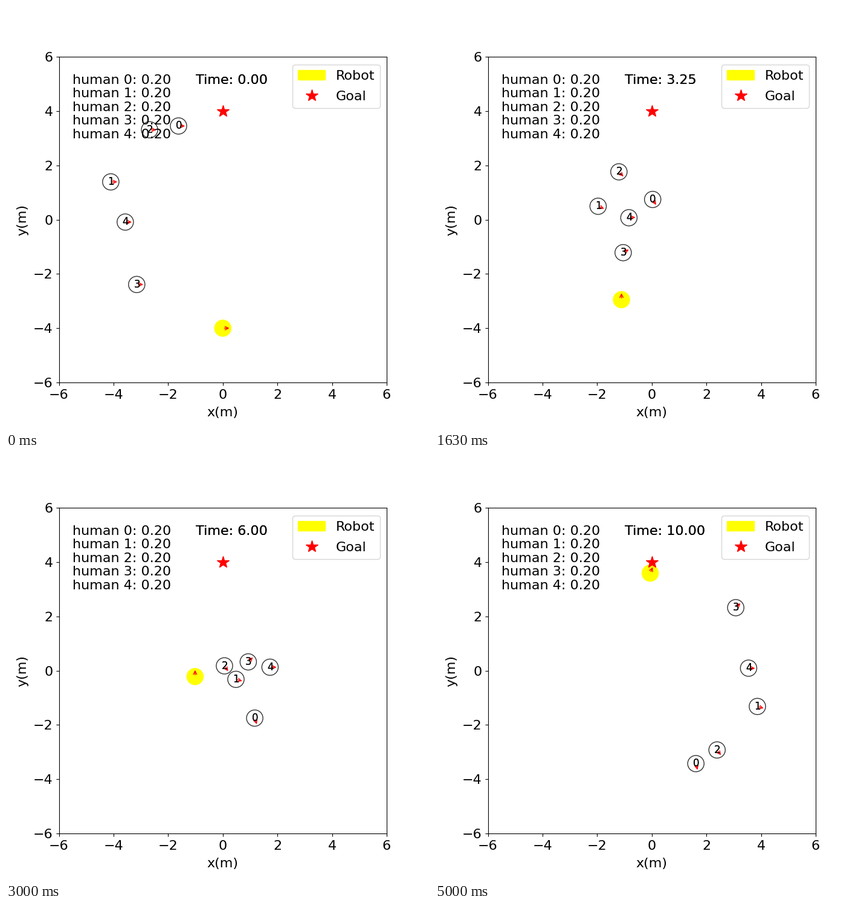
Write a matplotlib script that moves like this. It is 700 px wide and 700 px high and loops after 5.12 s.

```python
import numpy as np
import matplotlib.pyplot as plt
from matplotlib.animation import FuncAnimation
from matplotlib.lines import Line2D
from matplotlib.patches import ArrowStyle, Circle, FancyArrowPatch

LOOP_MS = 5120
STEPS = 41
DT = 0.25          # seconds per step; everyone's top speed is 1 m/s
CROSSING = 24      # steps spent dodging before heading straight for the goal
RADIUS = 0.3
LABEL_SHIFT = 0.11
GOAL = np.array([0, 4])


def human_path(x, y, lag, ease, sway):
    """Cross to the mirrored point, falling behind by lag and swerving by sway."""
    start = np.array([x, y])
    goal = -start
    ahead = goal / np.hypot(x, y)
    side = np.array([-ahead[1], ahead[0]])
    k = np.arange(CROSSING + 1)[:, None]
    along = DT * k - lag * (1 - np.exp(-k / ease))
    path = list(start + along * ahead + sway * np.sin(np.pi * k / 36) ** 2 * side)
    while len(path) < STEPS:
        gap = goal - path[-1]
        path.append(path[-1] + DT * gap / max(1, np.hypot(*gap)))
    return np.array(path)


def robot_path():
    """Wait beside the crowd, then zigzag to the goal in 22.5 degree headings."""
    keys = [0, 4, 5, 11, 20]
    k = np.arange(keys[-1] + 1)
    path = list(np.column_stack([
        np.interp(k, keys, [0, -0.07, -0.15, -1.11, -1.11]),
        np.interp(k, keys, [-4, -3.36, -3.28, -3.45, -1.2])]))
    while len(path) < STEPS:
        gap = GOAL - path[-1]
        tilt = np.pi / 8 if gap[0] > 0.235 * gap[1] else 0
        path.append(path[-1] + DT * np.array([np.sin(tilt), np.cos(tilt)]))
    return np.array(path)


def weights(k):
    """Attention per human; one of them drops out briefly mid-crossing."""
    return [0.25, 0.25, 0.25, 0.0, 0.25] if 19 <= k <= 21 else [0.2] * 5


paths = [
    robot_path(),
    human_path(-1.62, 3.45, lag=0.11, ease=6, sway=0.42),
    human_path(-4.10, 1.39, lag=1.17, ease=8, sway=-0.20),
    human_path(-2.68, 3.31, lag=4.45, ease=45, sway=0.21),
    human_path(-3.15, -2.39, lag=1.25, ease=11, sway=-0.41),
    human_path(-3.57, -0.09, lag=0.85, ease=14, sway=0.11),
]

fig, ax = plt.subplots(figsize=(7, 7), dpi=100)
ax.set(xlim=(-6, 6), ylim=(-6, 6))
ax.tick_params(labelsize=16)
ax.tick_params(axis="x", pad=4.5)
ax.set_xlabel("x(m)", fontsize=16, labelpad=6.5)
ax.set_ylabel("y(m)", fontsize=16, labelpad=5.5)

star = Line2D(GOAL[:1], GOAL[1:], color="red", marker="*", linestyle="None",
              markersize=15)
ax.add_artist(star)
robot = ax.add_artist(Circle(paths[0][0], RADIUS, color="yellow"))
ax.legend([robot, star], ["Robot", "Goal"], fontsize=16, loc="upper right",
          bbox_to_anchor=(1, 0.997), labelspacing=0.63)


def heavy_text(x, y, s, size):
    """Text drawn twice, which makes its edges firmer."""
    return [ax.text(x, y, s, fontsize=size, color="black") for _ in range(2)]


clock = heavy_text(-1, 5, "", 16)
scores = [ax.text(-5.5, 5 - 0.5 * i, "", fontsize=16) for i in range(5)]
humans = [ax.add_artist(Circle(p[0], RADIUS, fill=False)) for p in paths[1:]]
numbers = [heavy_text(0, 0, str(i), 12) for i in range(5)]
style = ArrowStyle("->", head_length=4, head_width=2)
arrows = [ax.add_artist(FancyArrowPatch(p[0], p[0] + (RADIUS, 0), color="red",
                                        arrowstyle=style)) for p in paths]


def update(k):
    for path, body, arrow in zip(paths, [robot] + humans, arrows):
        pos = path[k]
        vx, vy = pos - path[max(k - 1, 0)]
        theta = np.arctan2(vy, vx)
        body.center = tuple(pos)
        arrow.set_positions(pos, pos + RADIUS * np.array([np.cos(theta), np.sin(theta)]))
    for i, w in enumerate(weights(k)):
        humans[i].set_edgecolor(str(w))
        scores[i].set_text(f"human {i}: {w:.2f}")
        for t in numbers[i]:
            t.set_position(paths[i + 1][k] - LABEL_SHIFT)
    for t in clock:
        t.set_text(f"Time: {k * DT:.2f}")
    return []


anim = FuncAnimation(fig, update, frames=STEPS, interval=LOOP_MS / STEPS,
                     init_func=lambda: update(0), repeat=True, repeat_delay=0)
plt.show()
```
